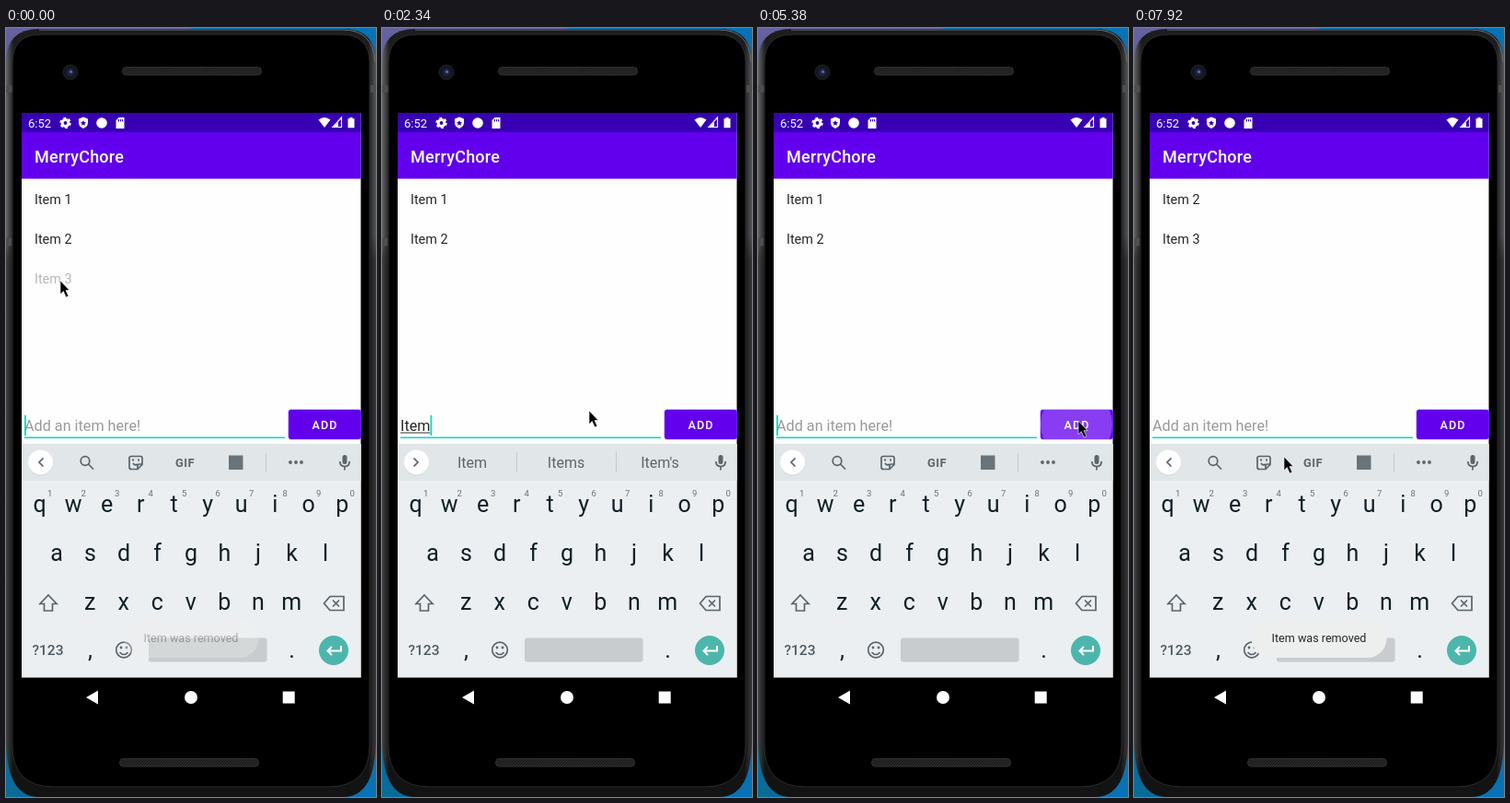
These frames come from a looping animation (402x834 px, 8000 ms). An HTML page:

```html
<!DOCTYPE html>
<html lang="en">
<head>
<meta charset="utf-8">
<title>To-do list</title>
<style>
  html, body { margin: 0; width: 100%; height: 100%; overflow: hidden; background: #000; }
  svg { display: block; width: 402px; height: 834px; font-family: Roboto, sans-serif; }
  text { white-space: pre; }
  .mid { text-anchor: middle; }
  .item { font-size: 14.4px; fill: #262626; }
  .entry { font-size: 16.2px; fill: #262626; }
  .key { font-size: 25px; fill: #0f2027; }
  .num { font-size: 9.5px; fill: #66727a; }
  .word { font-size: 16px; fill: #5b666c; }
  .line { fill: none; stroke: #58646b; stroke-width: 1.7; }
  .icon { fill: #5b666c; }
</style>
</head>
<body>
<svg viewBox="0 0 402 834">
  <defs>
    <linearGradient id="desk" x2="0" y2="1"><stop stop-color="#66629f"/><stop offset=".2" stop-color="#456a9f"/><stop offset="1" stop-color="#096b98"/></linearGradient>
    <linearGradient id="rim"><stop stop-color="#636567"/><stop offset=".02" stop-color="#1d1d1e"/><stop offset=".98" stop-color="#1d1d1e"/><stop offset="1" stop-color="#55575a"/></linearGradient>
    <linearGradient id="shade" x2="0" y2="1"><stop offset=".27" stop-opacity="0"/><stop offset=".3" stop-opacity=".35"/></linearGradient>
    <pattern id="mesh" width="3" height="3" patternUnits="userSpaceOnUse"><path d="M0 0h3v3H0z" fill="#1c1c1c"/><path d="M0 3 3 0" stroke="#333" stroke-width=".8"/></pattern>
    <clipPath id="buttonShape"><rect x="306.800" y="413.800" width="79" height="32.200" rx="3"/></clipPath>
    <path id="body" d="M0 37Q0 1 36 1H366Q402 1 402 37V770Q402 834 366 834H36Q0 834 0 770z"/>
  </defs>

  <!-- Phone body -->
  <path d="M0 0h201v834H0z" fill="url(#desk)"/>
  <path d="M201 0h201v834H201z" fill="#0872b6"/>
  <use href="#body" fill="url(#rim)"/>
  <use href="#body" fill="url(#shade)"/>
  <path d="M36 2H366Q399 2 401 37" fill="none" stroke="#6a6c6e"/>
  <path d="M0 62h7v8H0zM396 62h6v8h-6zM0 228h6v8H0z" fill="#4c4e50"/>
  <path d="M7 38Q7 7 38 7H364Q395 7 395 38V778Q395 823 350 823H52Q7 823 7 778z" stroke="#2b2c2d"/>
  <g fill="url(#mesh)" stroke="#303030">
    <rect x="126.500" y="42.500" width="151" height="8.500" rx="4"/>
    <rect x="123.500" y="792.500" width="151" height="8.500" rx="4"/>
  </g>
  <circle cx="70" cy="48" r="8" fill="#15161b" stroke="#202126"/>
  <circle cx="70" cy="48" r="4.500" fill="#1b2140"/>
  <circle cx="70.500" cy="47.500" r="1.700" fill="#5665a0"/>

  <!-- App -->
  <path d="M17 92h368.500v613H17z" fill="#fefefe"/>
  <path d="M17 92h368.500v21H17z" fill="#3700b3"/>
  <path d="M17 113h368.500v50.500H17z" fill="#6200ee"/>
  <g fill="#fff">
    <text x="24" y="107.500" font-size="13">6:52</text>
    <circle cx="64.500" cy="103" r="3.400" fill="none" stroke="#fff" stroke-width="3"/>
    <circle cx="64.500" cy="103" r="5.300" fill="none" stroke="#fff" stroke-width="1.800" stroke-dasharray="2.800 2.750"/>
    <path d="M84 96.500l5 2v4q0 4.500-5 6.500-5-2-5-6.500v-4z"/>
    <path d="M84 100l1 2 2 .3-1.500 1.400.4 2.100-1.900-1-1.900 1 .4-2.100-1.500-1.400 2-.3z" fill="#3700b3"/>
    <circle cx="104" cy="103" r="5.800"/>
    <path d="M122.500 97h6v12h-9v-9z"/>
    <path d="M122.500 99v2.500m2-2.500v2.500m2-2.500v2.500" stroke="#3700b3"/>
    <path d="M339.500 99.500q6.500-5 13 0l-6.500 8.500z"/>
    <path d="M364.500 97v10.500H355z" fill="none" stroke="#fff" stroke-width="1.200"/><path d="M361 102v6h-6z"/>
    <path d="M373.500 97h3v1.300h2v10h-7v-10h2z"/>
    <text x="31" y="145.500" font-size="18" font-weight="500" letter-spacing=".23">MerryChore</text>
  </g>
  <g id="items"></g>

  <path d="M20 443.500h283v1.600H20z" fill="#03dac5"/>
  <text id="hint" class="entry" x="20" y="437" style="fill:#9a9a9a">Add an item here!</text>
  <text id="entry" class="entry" x="20" y="437"></text>
  <rect id="underline" x="20" y="438.500" height="1" fill="#333"/>
  <rect id="caret" y="420" width="1.800" height="22" fill="#03dac5"/>

  <rect x="307" y="415" width="78.500" height="32" rx="3" opacity=".14"/>
  <g clip-path="url(#buttonShape)">
    <path d="M306 413h80v34h-80z" fill="#6200ee"/>
    <circle id="ripple" cx="346" cy="430" r="39" fill="#fff"/>
  </g>
  <text x="332.500" y="434.700" font-size="12.570" font-weight="500" letter-spacing="1.120" fill="#fff">ADD</text>

  <!-- Keyboard -->
  <path d="M17 451h368.500v254H17z" fill="#eceff1"/>
  <path d="M17 451h368.500v40H17z" fill="#e1e6e8"/>
  <circle cx="37.500" cy="471.700" r="13.500" fill="#cbd0d3"/>
  <circle cx="37.500" cy="471" r="13.500" fill="#fff"/>
  <path id="chevron" class="line" d="M3-4.500-1.500 0 3 4.500"/>
  <g id="tools">
    <circle class="line" cx="86" cy="469.500" r="4.800"/><path class="line" d="M89.500 473l5.500 5.500"/>
    <path class="line" d="M136 464.500h10q2 0 2 2v7l-5 5h-7q-2 0-2-2v-10q0-2 2-2zM148 473h-3q-2 0-2 2v3M138 472q2 3 5 1"/>
    <path class="icon" d="M137 467.500h2v2h-2zm6 0h2v2h-2z"/>
    <text class="icon mid" x="194.500" y="475.500" font-size="13" font-weight="700" letter-spacing=".4">GIF</text>
    <path d="M242 463.500h15.500v15.500H242z" fill="#69747a"/>
    <path d="M282.500 461v20" stroke="#c5cbce"/>
    <g class="icon"><circle cx="309" cy="471" r="1.900"/><circle cx="315" cy="471" r="1.900"/><circle cx="321" cy="471" r="1.900"/></g>
  </g>
  <g id="suggestions">
    <path d="M146.500 460v22m108-22v22" stroke="#c5cbce"/>
    <text class="word mid" x="98" y="477"></text>
    <text class="word mid" x="200" y="477"></text>
    <text class="word mid" x="302" y="477"></text>
  </g>
  <rect class="icon" x="365.500" y="463" width="5" height="10" rx="2.500"/>
  <path class="line" d="M362.800 470q0 5.500 5.200 5.500t5.200-5.500M368 475.500v4"/>
  <g id="keys"></g>
  <path class="line" d="M46 615l9 9.500h-4.500v7.500h-9v-7.500H37z"/>
  <path class="line" d="M352 616.500h15v15h-15l-6.500-7.500zm3 4 7 7m0-7-7 7"/>
  <text class="mid" x="45.500" y="680" font-size="15.500" font-weight="500" fill="#4d5a61">?123</text>
  <circle class="line" cx="128" cy="674.500" r="8.300"/>
  <path class="line" d="M123.500 677q4.500 5 9 0"/>
  <circle class="icon" cx="125" cy="672" r="1.400"/><circle class="icon" cx="131" cy="672" r="1.400"/>
  <rect x="155" y="661.500" width="128.500" height="26" rx="2.500" fill="#c8ccce"/>
  <circle cx="356" cy="675" r="16" fill="#4db6ac"/>
  <path d="M364 670v5.500h-14.500m4.500-4.500-4.500 4.500 4.500 4.500" fill="none" stroke="#fff" stroke-width="1.900"/>

  <g id="toast">
    <rect y="641" height="42" rx="21" fill="#edeeee"/>
    <text class="mid" x="201" y="666" font-size="12.570" fill="#262626"></text>
  </g>

  <!-- System navigation -->
  <path d="M17 704.500h369v43H17z"/>
  <g fill="#fff"><path d="M87 726l13-7.500v15z"/><circle cx="201" cy="726" r="7"/><path d="M300.700 719.500h13v13h-13z"/></g>

  <path id="pointer" d="M0 0v14.800l3.300-3.200 2.900 6.400 2.700-1.200-2.900-6.200H10z" stroke="#fff" stroke-width=".6"/>
</svg>
<script>
const LOOP = 8000;
const $ = id => document.getElementById(id);

function addText(parent, cls, x, y, text) {
  const node = document.createElementNS("http://www.w3.org/2000/svg", "text");
  node.setAttribute("class", cls);
  node.setAttribute("x", x);
  node.setAttribute("y", y);
  node.textContent = text;
  return parent.appendChild(node);
}

[["qwertyuiop", 36.700, 524.500], ["asdfghjkl", 55, 577.500], ["zxcvbnm", 91.300, 630.500]].forEach(([row, x, y]) =>
  [...row].forEach((key, i) => addText($("keys"), "key mid", x + i * 36.5, y, key)));
[..."1234567890"].forEach((n, i) => addText($("keys"), "num mid", 47.7 + i * 36.5, 507.5, n));
addText($("keys"), "key mid", 91.5, 683, ",");
addText($("keys"), "key mid", 310.5, 683, ".");
const items = [1, 2, 3].map(n => addText($("items"), "item", 31, 190.7, "Item " + n));

// Each track holds [start ms, ...values]; values hold until the next entry.
const pointerTrack = [
  [0, 59, 274], [290, 68, 278], [430, 92, 290], [570, 140, 327], [700, 190, 376], [840, 219, 408], [970, 225, 415],
  [4560, 238, 405], [4700, 275, 391], [4840, 314, 388], [4970, 341, 408], [5110, 348, 426],
  [5650, 320, 405], [5800, 238, 334], [5950, 130, 240], [6090, 68, 190], [6240, 53, 179],
  [7630, 68, 220], [7770, 128, 385], [7920, 163, 465]
];
// Text, caret x, word underlined, suggestions
const entryTrack = [
  [0, "", 20, 0, ""],
  [1790, "I", 24.5, 1, "I I'm I'll"],
  [1930, "It", 29.3, 1, "It It's Its"],
  [2200, "Ite", 38, 1, "Ite Item Items"],
  [2340, "Item", 52.5, 1, "Item Items Item's"],
  [2740, "Item ", 56.3, 0, "to I you"],
  [4010, "Item 3", 65.3, 0, "to I you"],
  [4130, "Item 3", 65.3, 0, ""],
  [5380, "", 20, 0, ""]
];
const caretTrack = [[0, 1], [290, 0], [700, 1], [1250, 0], [1650, 1], [3300, 0], [3730, 1],
  [4560, 0], [5110, 1], [5950, 0], [6380, 1], [6940, 0], [7350, 1], [7920, 0]];
const rippleTrack = [[0, 0], [5380, .24], [5500, .12], [5650, 0]];
// Opacity of the first and third item, rows scrolled away
const listTrack = [[0, 1, .33, 0], [160, 1, 0, 0], [5500, 1, .5, 0], [5650, 1, 1, 0],
  [7490, .35, 1, 0], [7630, 0, 1, .4], [7770, 0, 1, 1]];
const toastTrack = [[0, "removed", .33], [160, "removed", .85], [290, "removed", 1],
  [2070, "removed", .65], [2200, "removed", .25], [2340, "removed", 0],
  [5500, "added", .35], [5650, "added", .85], [5800, "added", 1],
  [7490, "added", .5], [7630, "removed", .3], [7770, "removed", .85], [7920, "removed", 1]];

const valuesAt = (track, t) => track.findLast(([start]) => start <= t).slice(1);
const show = (node, opacity) => node.setAttribute("opacity", +opacity);

function draw(t) {
  const [x, y] = valuesAt(pointerTrack, t);
  $("pointer").setAttribute("transform", `translate(${x} ${y})`);

  const [text, caretX, underlined, words] = valuesAt(entryTrack, t);
  $("entry").textContent = text;
  $("caret").setAttribute("x", caretX);
  $("underline").setAttribute("width", underlined ? caretX - 20 : 0);
  show($("hint"), !text);
  show($("caret"), valuesAt(caretTrack, t)[0]);
  show($("ripple"), valuesAt(rippleTrack, t)[0]);

  show($("tools"), !words);
  show($("suggestions"), !!words);
  $("chevron").setAttribute("transform", `translate(37.5 471) scale(${words ? -1 : 1} 1)`);
  const choices = words.split(" ");
  document.querySelectorAll(".word").forEach((node, i) => node.textContent = choices[i] || "");

  const [first, third, scrolled] = valuesAt(listTrack, t);
  items.forEach((node, i) => {
    show(node, [first, 1, third][i]);
    node.setAttribute("y", 190.7 + 43 * (i && i - scrolled));
  });

  const [verb, opacity] = valuesAt(toastTrack, t);
  const [pill, label] = $("toast").children;
  const width = verb === "added" ? 133 : 147;
  show($("toast"), opacity);
  pill.setAttribute("x", 201 - width / 2);
  pill.setAttribute("width", width);
  label.textContent = "Item was " + verb;
}

const begin = performance.now();
function tick() {
  draw((performance.now() - begin) % LOOP);
  requestAnimationFrame(tick);
}
tick();
</script>
</body>
</html>
```
